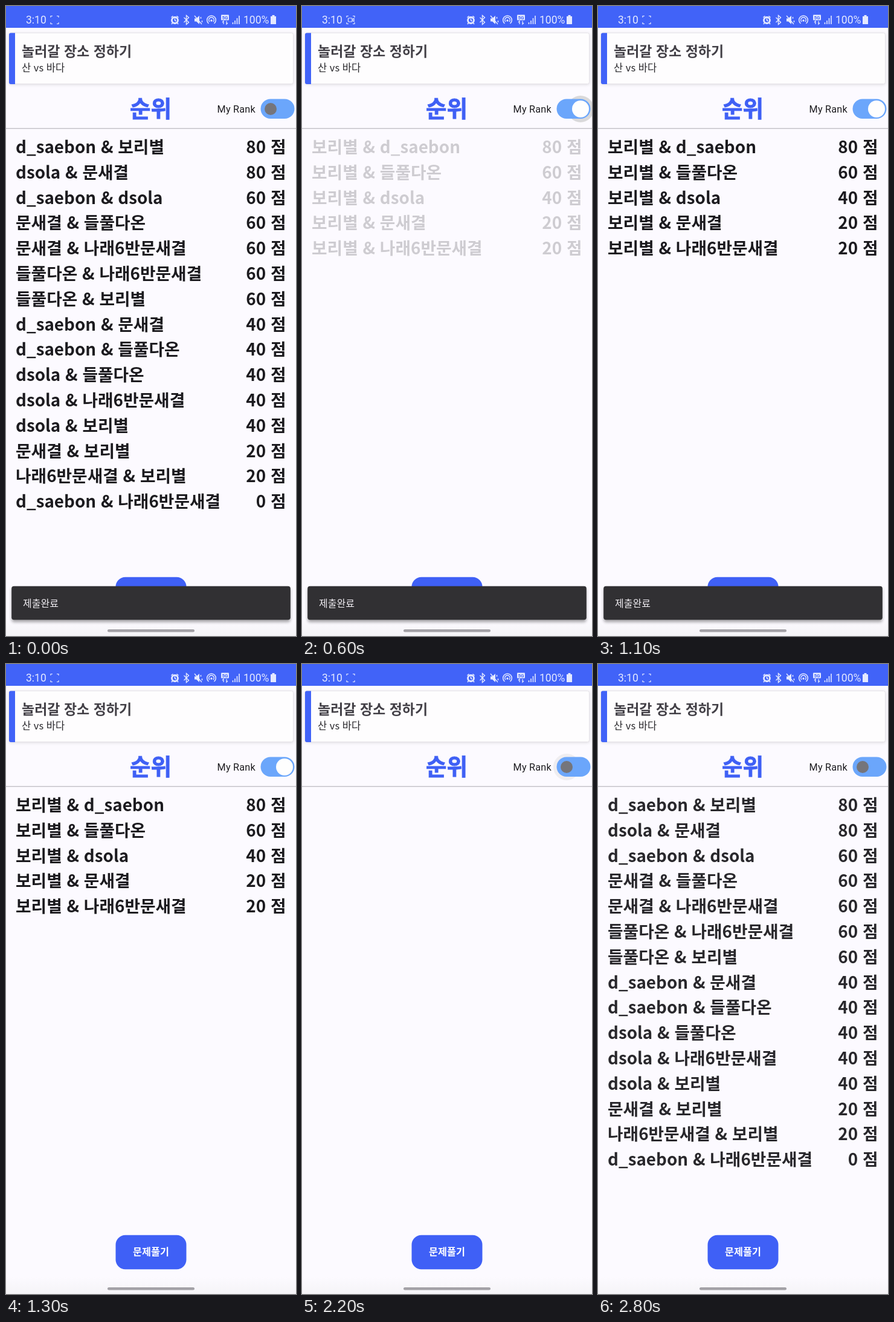
Recreate the animation shown at these times as an HTML page. Size 480 by 1040 pixels, loop 2900 ms.

```html
<!DOCTYPE html>
<html lang="ko">
<head>
<meta charset="utf-8">
<style>
  html, body { margin: 0; width: 100%; height: 100%; overflow: hidden; background: #fcfaff; }
  svg { display: block; width: 100%; height: 100%; }
  text { font-family: "Noto Sans CJK KR", "Noto Sans CJK", sans-serif; white-space: pre; }
  .ui { font-family: Roboto, sans-serif; }
  .list { font-size: 27.8px; font-weight: 700; fill: #1c1b1f; }
  .end { text-anchor: end; }
  .mid { text-anchor: middle; }
  .icons { fill: none; stroke: #e4e9ff; stroke-width: 1.6; }
  .solid { fill: #e4e9ff; stroke: none; }
</style>
</head>
<body>
<svg viewBox="0 0 480 1040" preserveAspectRatio="none">
  <defs>
    <filter id="soft" x="-10%" y="-30%" width="120%" height="170%"><feGaussianBlur stdDeviation="2.5"/></filter>
    <linearGradient id="foot" x2="0" y2="1">
      <stop stop-color="#fcfaff"/><stop offset="1" stop-color="#f5f4f7"/>
    </linearGradient>
  </defs>
  <rect width="480" height="1040" fill="#fcfaff"/>
  <rect y="1012" width="480" height="28" fill="url(#foot)"/>

  <!-- status bar -->
  <rect width="480" height="36" fill="#4163f8"/>
  <g class="icons">
    <text class="ui solid" x="33" y="29" font-size="17.5">3:10</text>
    <path d="M74 19v-2.500h3M84 16.500h3v2.500M87 27v2.500h-3M77 29.500h-3v-2.500" stroke-width="1.2"/>
    <g id="cam" stroke-width="1.2"><rect x="76.5" y="20" width="6.5" height="6" rx="1"/><path d="M83 22.5l3-2v5l-3-2"/></g>
    <circle cx="279.5" cy="23.5" r="5" stroke-width="2.8"/>
    <path d="M279.5 20.5v3l2 1.5M273.5 19l3-2.5M285.5 19l-3-2.5M275.5 28l-1.5 2M283.5 28l1.5 2"/>
    <path d="M294.5 19l8 8-4 3.5v-15l4 3.5-8 8" stroke-width="1.4"/>
    <path class="solid" d="M312 20.5h3l5-4.5v14l-5-4.5h-3z"/>
    <path d="M312 16l12 14M322.5 18v3M324.5 24v3" stroke-width="1.4"/>
    <path d="M335.5 29a7.3 7.3 0 1 1 9 0M337 26a4.2 4.2 0 1 1 6 0" stroke-width="1.5"/>
    <circle class="solid" cx="340" cy="24" r="1.7"/>
    <rect class="solid" x="356" y="14.5" width="13" height="9" rx="1"/>
    <text class="ui mid" x="362.5" y="22" font-size="8" font-weight="700" style="fill:#4163f8;stroke:none">5G</text>
    <path d="M360 30v-5l-2 2M365 25v5l2-2" stroke-width="1.3"/>
    <path d="M375.5 30v-3M379 30v-6M382.5 30v-10M386 30v-14" stroke-width="1.6"/>
    <text class="ui solid" x="393" y="29" font-size="17.5">100%</text>
    <path class="solid" d="M440.5 15h4v2h2.5v13h-9v-13h2.5z"/>
  </g>

  <!-- topic card -->
  <rect x="5" y="45" width="471" height="85" rx="3" opacity=".12" filter="url(#soft)"/>
  <rect x="5.5" y="44.5" width="470" height="84" rx="3" fill="#fefdfe" stroke="#e6e4e9"/>
  <path d="M15 44.5v84.5h-7a3 3 0 0 1-3-3v-78.500a3 3 0 0 1 3-3z" fill="#4163f8"/>
  <text x="26" y="83" font-size="23" font-weight="700" fill="#434047">놀러갈 장소 정하기</text>
  <text x="26" y="108" font-size="16.5" fill="#29282c">산 vs 바다</text>

  <!-- heading and switch -->
  <text class="mid" x="239.5" y="183" font-size="37.5" font-weight="900" fill="#3f60f5" stroke="#3f60f5" stroke-width=".8">순위</text>
  <text class="ui" x="349.5" y="176" font-size="16.2" letter-spacing=".25" fill="#1c1b1f">My Rank</text>
  <circle id="halo" cy="170" r="22" fill="#8d8c84"/>
  <rect x="421.5" y="153.5" width="56" height="32.5" rx="16.25" fill="#6ba6fb"/>
  <circle id="thumb" cy="170"/>
  <rect y="201.5" width="480" height="1.5" fill="#c6c4ca"/>

  <g id="all" class="list"></g>
  <g id="mine" class="list"></g>

  <!-- bottom controls -->
  <rect x="181.5" y="942.7" width="117" height="56.6" rx="16" fill="#3f60f6"/>
  <text class="mid" x="240" y="976" font-size="16.3" font-weight="700" fill="#fff">문제풀기</text>
  <g id="snack">
    <rect x="9.5" y="961" width="461" height="56" rx="4" opacity=".35" filter="url(#soft)"/>
    <rect x="9.2" y="957.7" width="461.6" height="55.6" rx="4" fill="#313033"/>
    <text x="28" y="991.5" font-size="16" fill="#f2eff4">제출완료</text>
  </g>
  <rect x="168" y="1029" width="144" height="4.5" rx="2.25" fill="#a3a1a6"/>
</svg>
<script>
const $ = id => document.getElementById(id);
const [A, B, C, D, E, F] = ['d_saebon', 'dsola', '문새결', '들풀다온', '나래6반문새결', '보리별'];

function fillList(id, rows) {
  $(id).innerHTML = rows.map(([a, b, score], i) => {
    const y = 243 + i * 41.8;
    return `<text x="16" y="${y}">${a} &amp; ${b}</text><text class="end" x="463.5" y="${y}">${score} 점</text>`;
  }).join('');
}
fillList('all', [
  [A, F, 80], [B, C, 80], [A, B, 60], [C, D, 60], [C, E, 60],
  [D, E, 60], [D, F, 60], [A, C, 40], [A, D, 40], [B, D, 40],
  [B, E, 40], [B, F, 40], [C, F, 20], [E, F, 20], [A, E, 0]
]);
fillList('mine', [[F, A, 80], [F, D, 60], [F, B, 40], [F, C, 20], [F, E, 20]]);

// Linear interpolation through alternating time, value pairs
function track(t, ...k) {
  if (t <= k[0]) return k[1];
  for (let i = 2; i < k.length; i += 2)
    if (t <= k[i]) return k[i - 1] + (k[i + 1] - k[i - 1]) * (t - k[i - 2]) / (k[i] - k[i - 2]);
  return k[k.length - 1];
}

const set = (id, attrs) => { for (const a in attrs) $(id).setAttribute(a, attrs[a]); };
const mix = (a, b, p) => a + (b - a) * p;

function draw(t) {
  const on = track(t, 300, 0, 400, .5, 500, 1, 1800, 1, 1900, .83, 2000, .4, 2100, 0);
  const cx = mix(438, 461, on);
  const white = track(on, 0, 0, .4, 1);
  const rgb = [117, 117, 123].map(c => Math.round(mix(c, 254, white)));
  set('thumb', { cx, r: mix(10, 14, on), fill: `rgb(${rgb})` });
  set('halo', { cx, opacity: track(t, 300, 0, 400, .3, 600, .3, 800, 0, 1900, 0, 2000, .25, 2100, .25, 2300, 0) });
  set('all', { opacity: track(t, 300, 1, 500, 0, 2200, 0, 2300, .2, 2400, .58, 2500, .78, 2800, .94) });
  set('mine', { opacity: track(t, 500, 0, 600, .2, 700, .58, 800, .85, 900, 1, 2000, 1, 2200, 0) });
  set('snack', { opacity: track(t, 1100, 1, 1200, .3, 1300, 0) });
  set('cam', { opacity: (t >= 500 && t < 1000) || (t >= 1600 && t < 2100) ? 1 : 0 });
}

// The picture advances in steps of 100 ms
const start = performance.now();
function tick() {
  draw(Math.floor((performance.now() - start) % 2900 / 100) * 100);
  requestAnimationFrame(tick);
}
tick();
</script>
</body>
</html>
```
